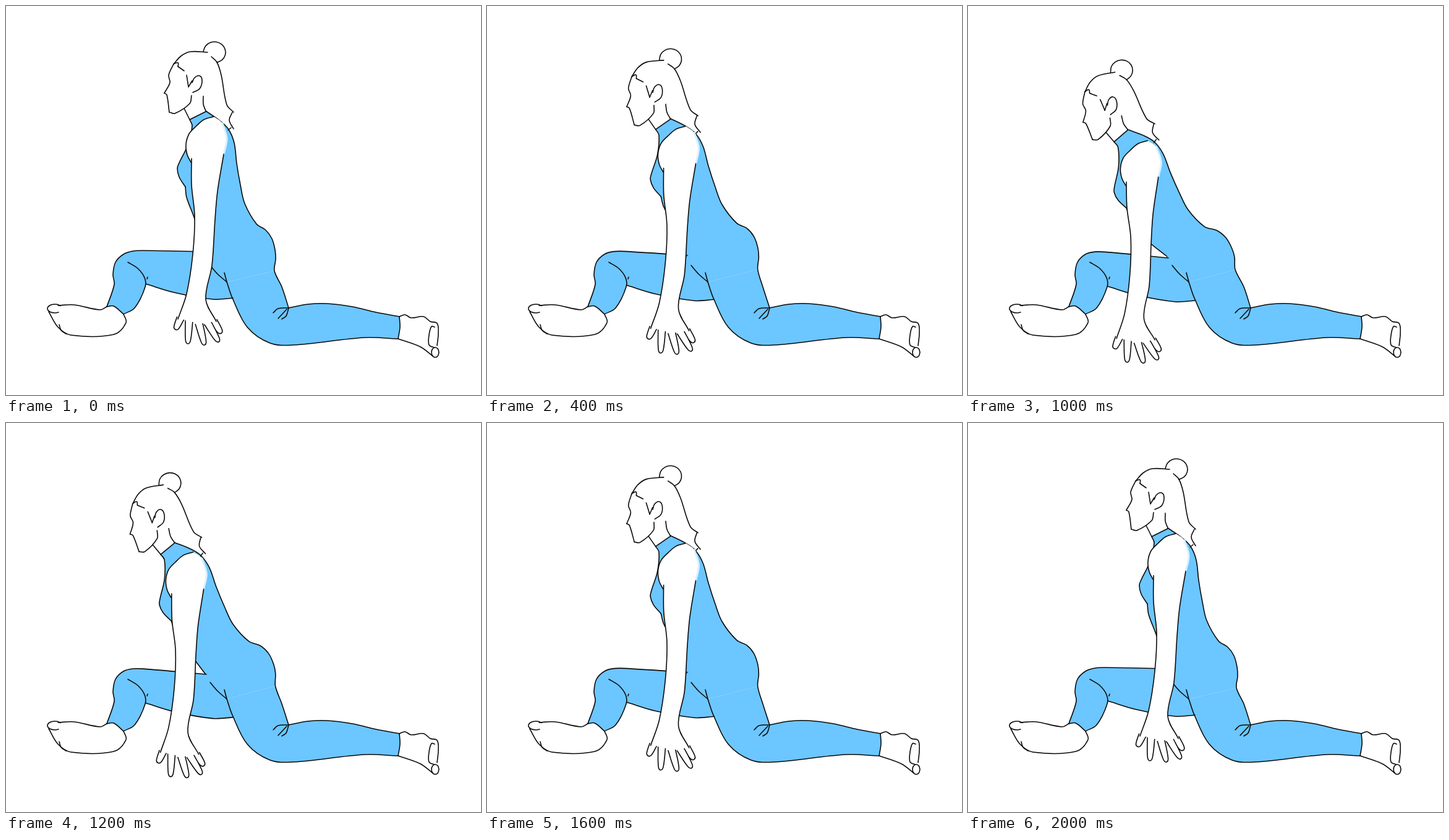
These frames come from a looping animation (768x630 px, 2200 ms). An HTML page with a canvas:

```html
<!DOCTYPE html>
<html lang="en">
<head>
<meta charset="utf-8">
<title>Low lunge stretch</title>
<style>
html, body { margin: 0; height: 100%; overflow: hidden; background: #fff; }
canvas { display: block; }
</style>
</head>
<body>
<canvas id="stage" width="768" height="630"></canvas>
<script>
const ctx = document.getElementById('stage').getContext('2d');
const BLUE = '#6cc6ff', INK = '#0a0a0a', WHITE = '#fff';
const NECK = [323, 170], SHOULDER = [300, 247], GROIN = [357, 447];
const rad = degrees => degrees * Math.PI / 180;

const points = text => text.split(' ').map(pair => pair.split(',').map(Number));
const reversed = curve => [...curve].reverse();

function arc(cx, cy, rx, ry, from, to) {
  return Array.from({ length: 9 }, (_, i) => {
    const a = rad(from + (to - from) * i / 8);
    return [cx + rx * Math.cos(a), cy + ry * Math.sin(a)];
  });
}

// Joins smooth curves end to end. Tangents run parallel to the neighbours' chord,
// with handles a third of each segment long, so uneven spacing never overshoots.
function outline(...curves) {
  const path = new Path2D();
  const handle = (at, from, to, length) => {
    const scale = length / 3 / (Math.hypot(to[0] - from[0], to[1] - from[1]) || 1);
    return [at[0] + (to[0] - from[0]) * scale, at[1] + (to[1] - from[1]) * scale];
  };
  curves.forEach((p, n) => {
    path[n ? 'lineTo' : 'moveTo'](...p[0]);
    for (let i = 0; i < p.length - 1; i++) {
      const b = p[i], c = p[i + 1], a = p[i - 1] || b, d = p[i + 2] || c;
      const length = Math.hypot(c[0] - b[0], c[1] - b[1]);
      path.bezierCurveTo(...handle(b, a, c, length), ...handle(c, d, b, length), ...c);
    }
  });
  return path;
}
function fill(color, ...curves) {
  ctx.fillStyle = color;
  ctx.fill(outline(...curves));
}
function ink(...curves) {
  for (const c of curves) ctx.stroke(outline(c));
}

const bun = arc(337, 75, 18, 17, 185, 437);
const hair = ['271,94 283,81 298,74 326,75', '332,82 341,91 348,112 357,160 368,172',
  '366,172 361,185 368,199', '364,197 359,201', '271,94 278,92 278,98', '278,98 288,105'].map(points);
const face = ['271,94 263,112 265,124 256,141', '256,141 260,144 264,172',
  '264,172 273,174 297,158 300,145', '292,112 295,131', '295,131 301,121'].map(points);
const ear = points('301,124 305,116 313,113 317,121 313,134 302,140');
const throat = ['319,146 319,159 323,170', '288,166 297,184'].map(points);

const collar = points('297,184 323,171');
const chest = points('297,184 301,194 294,225 280,254 277,263 280,277 290,293');
const belly = points('290,293 292,310 305,345');
const fold = [322, 406];
const back = points('323,170 346,186 360,200 369,222 373,255 379,290 386,320');
const hip = points('405,353 420,363 430,377 435,395 436,410 434,429');

const armhole = points('336,179 320,184 307,195 296,207 291,224 293,241 299,253');
const armFront = points('300,247 300,290 305,340 302,402 292,466 278,507');
const armRear = points('340,511 323,475 333,420 338,345 342,300 352,240');
const shoulderEdge = points('352,240 357,215 350,190 336,179');
const knuckles = points('282,506 296,510 312,514 326,513 336,511');
const fingertips = points('274,524 294,547 321,549 344,544 348,530');

const thighTop = points('190,402 205,397 222,396 324,398');
const thighUnder = points('226,450 272,464 335,475 367,473');
const shin = points('163,487 175,451 173,435 177,415 190,402');
const knee = points('197,415 213,425 224,440');
const calf = points('224,440 225,455 208,489 190,499');
const instep = points('163,487 174,486 190,499');
const frontFoot = ['84,485 110,484 152,492 163,487', '69,495 84,520 105,533 174,532 194,513 190,499',
  '86,516 89,525 97,531'].map(points);
const bigToe = arc(79, 490, 12, 7, 60, 320);

const thighRear = points('446,455 457,489');
const calfTop = points('457,489 488,483 520,482 560,487 598,496 636,503');
const ankle = points('636,503 637,520 634,539');
const legUnder = points('634,539 580,537 465,549 427,546 390,520 366,473 357,447');
const creases = ['353,432 357,447', '330,420 342,434 357,447', '457,489 440,490 432,497',
  '454,491 440,506', '457,489 453,502 446,507', '228,442 229,439'].map(points);
const rearFoot = ['636,503 645,500 655,505 675,503 686,511 697,514 699,530 697,550',
  '690,567 670,552 634,539', '693,520 688,519 684,533 684,549 692,553'].map(points);
const smallToe = arc(694, 561, 6, 8, 0, 360);

// A tapering loop from the knuckle round the tip and back.
function finger(base, tip) {
  const dx = tip[0] - base[0], dy = tip[1] - base[1], length = Math.hypot(dx, dy);
  const at = (along, side) => [base[0] + dx * along - dy / length * side,
                               base[1] + dy * along + dx / length * side];
  return [at(0, 6), at(.85, 4), at(1, 0), at(.85, -4), at(0, -6)];
}
const fingers = knuckles.map((base, i) => finger(base, fingertips[i]));

function inFrame(from, to, degrees, stretch, paint) {
  ctx.save();
  ctx.translate(...to);
  ctx.rotate(-rad(degrees));
  ctx.scale(1, stretch);
  ctx.translate(-from[0], -from[1]);
  paint();
  ctx.restore();
}

function drawArm() {
  for (const f of reversed(fingers)) {
    fill(WHITE, f);
    ink(f);
  }
  fill(WHITE, armhole, armFront, knuckles, armRear, shoulderEdge);
  ctx.save();
  ctx.strokeStyle = '#d8f0ff';
  ctx.lineWidth = 3;
  ink(shoulderEdge.slice(0, 3));
  ctx.restore();
  ink(armhole, armFront, armRear);
}

// depth runs from 0, upright, to 1, the deepest lunge.
function draw(depth) {
  const ease = depth * (1.7 - .7 * depth);
  const lean = 14.2 * ease, c = Math.cos(rad(lean)), s = Math.sin(rad(lean));
  const neck = [NECK[0] - 65 * depth, NECK[1] + 30 * depth];
  const shoulder = [SHOULDER[0] - 44 * depth ** 1.25, SHOULDER[1] + 38 * depth];

  const tilt = curve => curve.map(([x, y]) => {
    const u = x - NECK[0], v = y - NECK[1];
    return [neck[0] + u * c + v * s, neck[1] - u * s + v * c];
  });
  // The hip follows the torso less and less towards the leg.
  const seat = tilt(hip).map((p, i) => p.map((v, axis) => v + (hip[i][axis] - v) * .12 * i));
  const top = thighTop.map(([x, y]) => [x, y + .075 * ease * (x - 190)]);
  const under = thighUnder.map(([x, y]) => [x, y + 4 * ease]);
  const front = tilt(chest), waist = [...tilt(belly), fold], spine = tilt(back);

  ctx.fillStyle = WHITE;
  ctx.fillRect(0, 0, 768, 630);
  ctx.strokeStyle = INK;
  ctx.lineWidth = 1.6;
  ctx.lineCap = ctx.lineJoin = 'round';

  fill(BLUE, shin, top, [GROIN, [367, 473]], reversed(under), calf.slice(1), reversed(instep));
  fill(BLUE, front, waist, [GROIN], reversed([...spine, ...seat]), reversed(tilt(collar)));
  fill(BLUE, [GROIN, seat[5]], thighRear, calfTop, ankle, legUnder);

  ink([...shin, ...top.slice(1)], [...knee, ...calf.slice(1)], under, instep, ...frontFoot, bigToe);
  ink([...spine, ...seat, ...thighRear], calfTop, ankle, legUnder, ...creases, ...rearFoot, smallToe);
  ink(front, waist, tilt(collar));
  inFrame(NECK, neck, lean, 1, () => ink(bun, ...hair, ...face, ear, ...throat));
  inFrame(SHOULDER, shoulder, 1.4 * depth ** 2, 1 - .027 * depth ** 3, drawArm);
}

const depths = [0, .2, .41, .55, .78, 1];
function tick(now) {
  const step = Math.floor(now % 2200 / 200);
  draw(depths[Math.min(step, 10 - step)]);
  requestAnimationFrame(tick);
}
draw(0);
requestAnimationFrame(tick);
</script>
</body>
</html>
```
